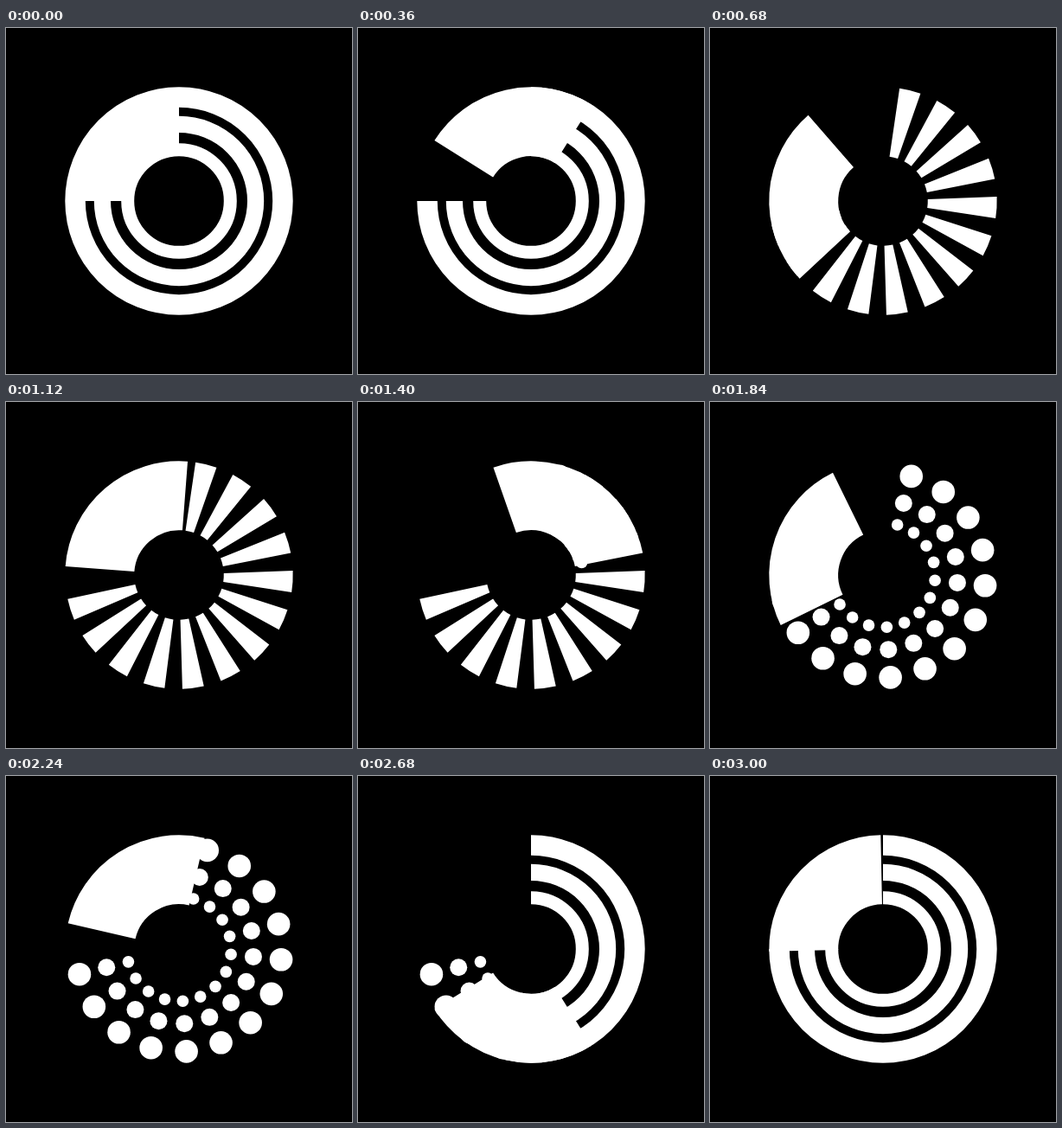
Recreate the animation shown at these times as an HTML page with a canvas. Size 400 px wide and 400 px high, loop 3.04 s.

```html
<!DOCTYPE html>
<html>
<head>
<meta charset="utf-8">
<style>
  html, body { margin: 0; width: 100%; height: 100%; overflow: hidden; background: #000; }
  canvas { display: block; }
</style>
</head>
<body>
<canvas id="stage" width="400" height="400"></canvas>
<script>
const ctx = document.getElementById('stage').getContext('2d');
const LOOP = 3040, STEP = 40, INNER = 51.8, OUTER = 131.7;
const rad = deg => (deg - 90) * Math.PI / 180; // 0 degrees is the top, clockwise

function band(from, to, r1, r2) {
  if (to <= from) return;
  ctx.lineWidth = r2 - r1;
  ctx.beginPath();
  ctx.arc(200, 200, (r1 + r2) / 2, rad(from), rad(to));
  ctx.stroke();
}

function rings(lo, hi) {
  for (const [r1, r2] of [[INNER, 66.8], [79, 98.2], [108.2, OUTER]])
    band(Math.max(lo, 0), Math.min(hi, 270), r1, r2);
}

function spokes(lo, hi) {
  for (let k = 0; k < 13; k++) {
    const a = 13.8 + 19.88 * k;
    band(Math.max(lo, a - 5.45), Math.min(hi, a + 5.45), INNER, OUTER);
  }
}

// The innermost row of dots appears ahead of the other two.
function dots(lo, hi, innerHi = hi) {
  for (const [r, size, end] of [[60.4, 6.8, innerHi], [86.4, 10, hi], [118.7, 13.3, hi]])
    for (let k = 0; k < 13; k++) {
      const a = 16 + 19.98 * k;
      if (a < lo || a > end) continue;
      ctx.beginPath();
      ctx.arc(200 + r * Math.cos(rad(a)), 200 + r * Math.sin(rad(a)), size, 0, 7);
      ctx.fill();
    }
}

// Cubic bezier easing (x1, 0, x2, 1)
function ease(x, x1, x2) {
  let lo = 0, hi = 1;
  for (let i = 0; i < 30; i++) {
    const s = (lo + hi) / 2, u = 1 - s;
    if (3 * x1 * s * u * u + 3 * x2 * s * s * u + s ** 3 < x) lo = s; else hi = s;
  }
  return lo * lo * (3 - 2 * lo);
}

const turns = [
  { start: 0, end: 1000, x1: .91, x2: .234, before: rings, after: spokes },
  { start: 1000, end: 2080, x1: .619, x2: .444, before: spokes, after: dots },
  { start: 2080, end: LOOP, x1: .541, x2: .57, before: dots, after: rings }
];

function draw(t) {
  const turn = turns.find(s => t < s.end);
  const head = 360 * ease((t - turn.start) / (turn.end - turn.start), turn.x1, turn.x2);
  const swap = head - 45; // patterns change places behind the sector
  ctx.fillStyle = '#000';
  ctx.fillRect(0, 0, 400, 400);
  ctx.fillStyle = ctx.strokeStyle = '#fff';
  turn.before(swap, 360);
  turn.after(0, swap, head * 1.3);
  band(head - 90, head, INNER, OUTER);
}

const begin = performance.now();
function tick() {
  const t = (performance.now() - begin) % LOOP;
  draw(Math.floor(t / STEP) * STEP);
  requestAnimationFrame(tick);
}
tick();
</script>
</body>
</html>
```
